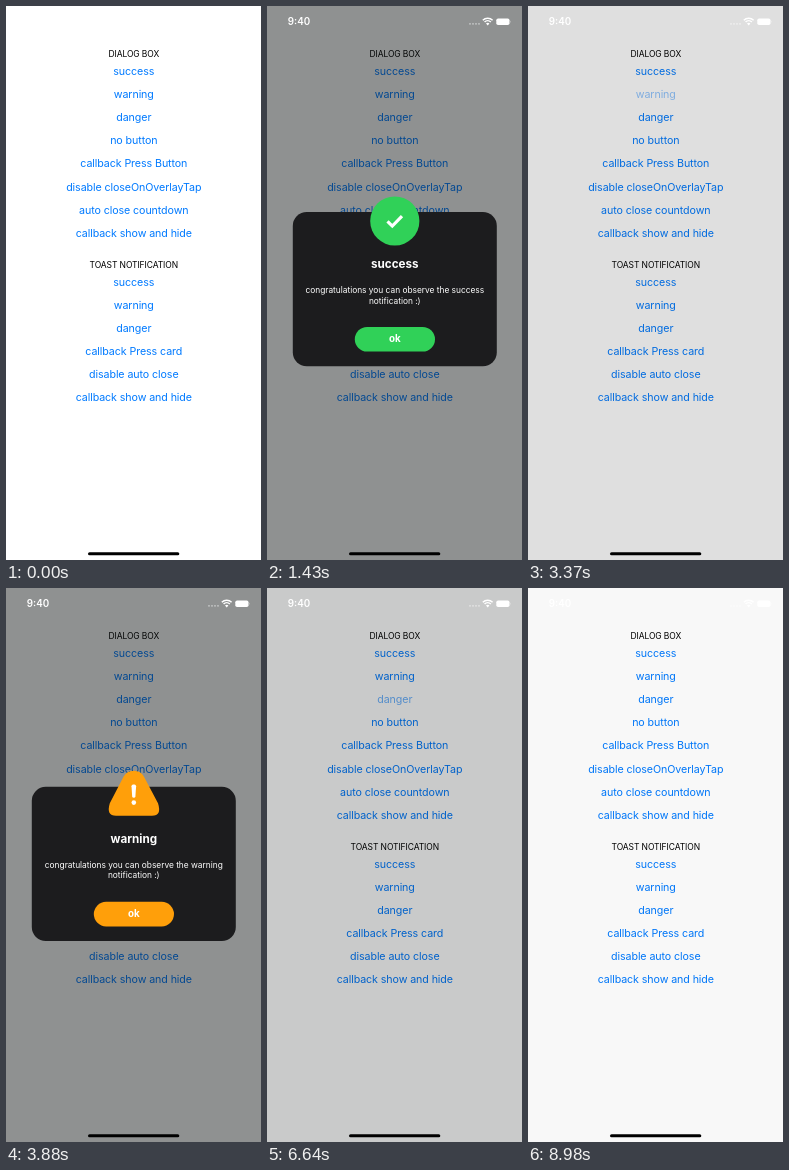
Animation of 255 by 554 pixels, one loop 9030 ms. Source, as an HTML page:

```html
<!DOCTYPE html>
<html lang="en">
<head>
<meta charset="utf-8">
<title>Dialog demo</title>
<style>
  html, body { margin: 0; width: 100%; height: 100%; overflow: hidden; background: #fff; }
  svg { display: block; width: 100vw; height: 100vh; font-family: Inter, "Liberation Sans", sans-serif; }
  text { text-anchor: middle; }
  .head { font-size: 8.5px; letter-spacing: -.1px; fill: #000; }
  .link { font-size: 10.7px; letter-spacing: -.1px; fill: #007aff; }
  .title { font-size: 11.7px; font-weight: 700; fill: #fff; }
  .msg { font-size: 8.4px; letter-spacing: -.02px; fill: #fff; }
  .ok { font-size: 9.8px; font-weight: 700; fill: #fff; }
  .time { font-size: 9.8px; font-weight: 600; fill: #fff; }
</style>
</head>
<body>
<svg id="stage" viewBox="0 0 255 554"></svg>
<script>
const LOOP = 9030, FADE = 250, MID = 127.8, DROP = 364;

const lists = [
  { head: 'DIALOG BOX', y: 50.7, rows: ['success', 'warning', 'danger', 'no button', 'callback Press Button',
    'disable closeOnOverlayTap', 'auto close countdown', 'callback show and hide'] },
  { head: 'TOAST NOTIFICATION', y: 261.6, rows: ['success', 'warning', 'danger', 'callback Press card',
    'disable auto close', 'callback show and hide'] }
];

const bang = y => `<g fill="#fff"><path d="M125.5 ${y + 1.6}q.1-1.6 1.6-1.6h1.4q1.5 0 1.6 1.6l-.7 10.2q-.1 1.4-1.6 1.4t-1.6-1.4z"/>
  <circle cx="${MID}" cy="${y + 18}" r="2.3"/></g>`;

// press, open and close are times in ms
const dialogs = [
  { name: 'success', color: '#30d158', press: 100, open: 242, close: 1952,
    icon: `<circle cx="${MID}" cy="215" r="24.6"/>
      <path d="M120.5 215.3l4.8 4.8 9.7-9.9" fill="none" stroke="#fff" stroke-width="3.2"/>` },
  { name: 'warning', color: '#ff9f0a', press: 3070, open: 3240, close: 5200,
    icon: `<path d="M117.5 196Q120.5 190 127.8 190T138 196L152 222.5Q156 235 146 235H110Q100 235 103.8 222.5Z"/>${bang(203.8)}` },
  { name: 'danger', color: '#ff453a', press: 6370, open: 6508, close: 8515,
    icon: `<rect x="107.3" y="196.5" width="41" height="41" rx="7" transform="rotate(45 ${MID} 217)"/>${bang(207.5)}` }
];

const label = (cls, y, s, x = MID) => `<text class="${cls}" x="${x}" y="${y}">${s}</text>`;

const page = lists.map(l => label('head', l.y, l.head) +
  l.rows.map((r, i) => label('link', (l.y + 18 + 23.17 * i).toFixed(2), r)).join('')).join('');

const card = d => `<g class="card" fill="${d.color}" display="none">
  <rect x="25.8" y="206" width="204" height="154.3" rx="14" fill="#1c1c1e"/>
  ${d.icon}
  ${label('title', 262, d.name)}
  ${label('msg', 287.2, 'congratulations you can observe the ' + d.name)}
  ${label('msg', 297.7, 'notification :)')}
  <rect x="87.8" y="321" width="80.2" height="24.6" rx="12.3"/>
  ${label('ok', 336.5, 'ok')}</g>`;

const wifi = [7, 4.5].map(r => {
  const k = r * .7;
  return `<path d="M${220.7 - k} ${19.2 - k}a${r} ${r} 0 0 1 ${2 * k} 0" fill="none" stroke="#fff" stroke-width="1.5"/>`;
}).join('') + '<path d="M220.7 19.4l-1.7-1.8a2.5 2.5 0 0 1 3.4 0z"/>';

const status = `<g fill="#fff">${label('time', 18.9, '9:40', 32)}
  <g opacity=".5">${[203, 206, 209, 212].map(x => `<circle cx="${x}" cy="17.8" r=".9"/>`).join('')}</g>
  ${wifi}
  <rect x="229.3" y="12.4" width="13.2" height="6.7" rx="1.8"/>
  <path d="M243.2 14.6q1.2 1.1 0 2.3z" opacity=".6"/></g>`;

const stage = document.getElementById('stage');
stage.innerHTML = `<rect width="255" height="554" fill="#fff"/>${page}
  <rect id="shade" width="255" height="554" fill="#080c0c" opacity="0"/>
  ${status}${dialogs.map(card).join('')}
  <rect id="bar" x="82" y="546.2" width="91.3" height="3.1" rx="1.55"/>`;

const shade = document.getElementById('shade');
const bar = document.getElementById('bar');
const cards = stage.querySelectorAll('.card');
const links = stage.querySelectorAll('.link');

const clamp = v => Math.min(1, Math.max(0, v));
const easeIn = v => v ** 1.67;
const inOut = v => v < .5 ? easeIn(2 * v) / 2 : 1 - easeIn(2 - 2 * v) / 2;
const ramp = (t, from) => inOut(clamp((t - from) / FADE));
const spring = s => Math.exp(-11 * s) * (Math.cos(10.45 * s) + 1.053 * Math.sin(10.45 * s));

function draw(now) {
  const t = Math.max(0, Math.floor((now - 30) / 50) * 50 + 30); // 20 pictures a second
  let dim = 0, covered = false;
  dialogs.forEach((d, i) => {
    dim += ramp(t, d.open) - ramp(t, d.close + FADE);

    const rise = d.open + FADE;
    const shown = t >= rise && t < d.close + FADE;
    const y = t < d.close ? DROP * spring((t - rise) / 1000) : DROP * ramp(t, d.close);
    cards[i].setAttribute('display', shown ? 'inline' : 'none');
    if (shown) {
      cards[i].setAttribute('transform', `translate(0 ${y.toFixed(2)})`);
      covered = covered || (y > 190 && y < 340);
    }

    links[i].setAttribute('opacity', now < d.press ? 1 : .2 + .8 * ramp(t, d.open));
  });
  shade.setAttribute('opacity', .45 * dim);
  bar.setAttribute('fill', covered ? '#4c4c4e' : '#000');
}

const start = performance.now();
function tick() {
  draw((performance.now() - start) % LOOP);
  requestAnimationFrame(tick);
}
tick();
</script>
</body>
</html>
```
